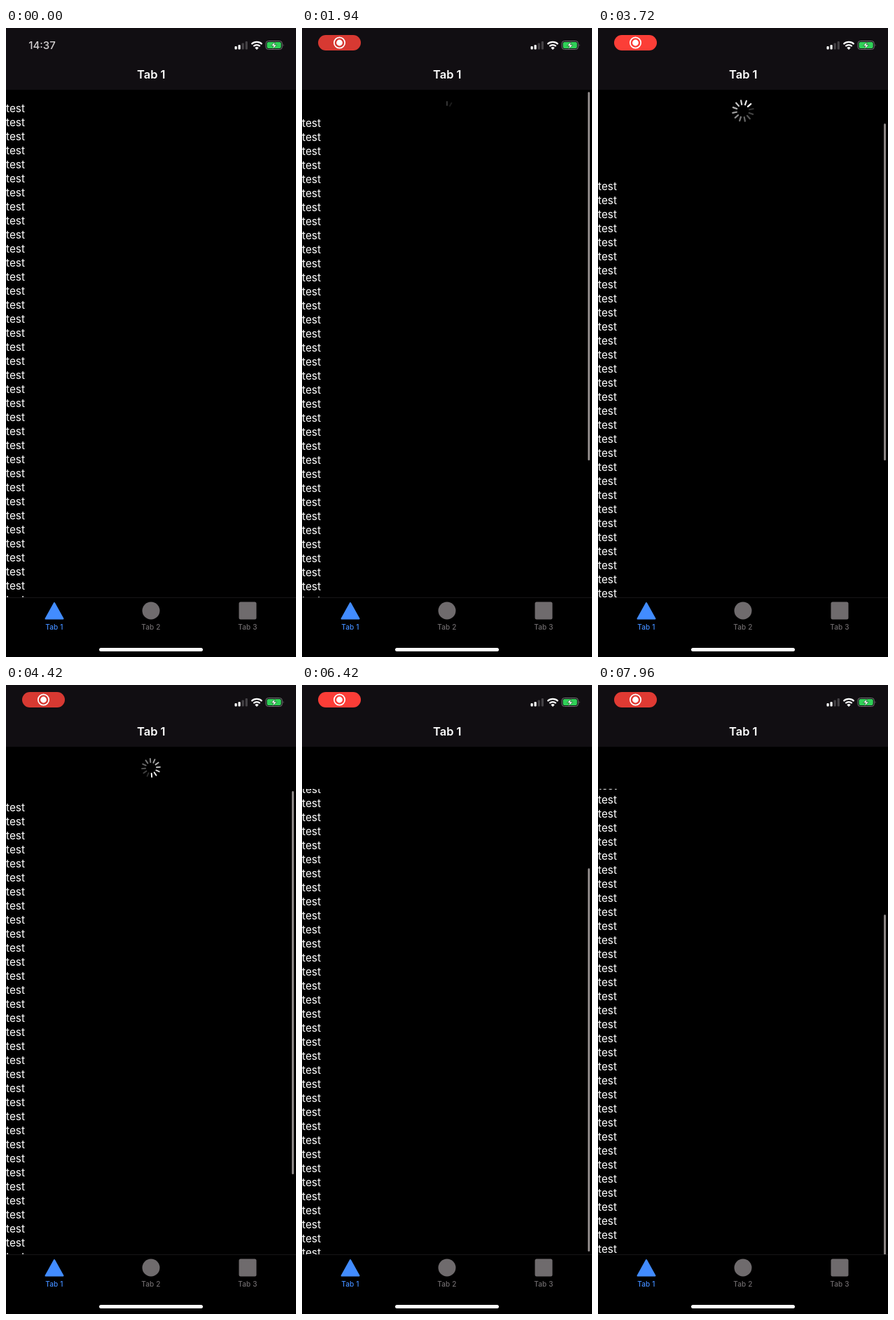
Animation of 414x896 px, one loop 8 s. Source, as an HTML page:

```html
<!DOCTYPE html>
<html lang="en">
<head>
<meta charset="utf-8">
<title>Pull to refresh</title>
<style>
  html, body { margin: 0; width: 100%; height: 100%; overflow: hidden; background: #000; }
  svg { display: block; width: 414px; height: 896px; font-family: Inter, "Open Sans", sans-serif; }
  .row { font-size: 15.4px; fill: #fff; }
  .title { font-size: 16.5px; font-weight: 600; fill: #fff; }
  .clock { font-size: 15px; font-weight: 500; fill: #d2cfd0; }
  .tab { font-size: 10px; font-weight: 500; letter-spacing: .2px; }
  .title, .clock, .tab { text-anchor: middle; }
</style>
</head>
<body>
<svg viewBox="0 0 414 896">
  <defs><clipPath id="viewport"><rect id="window" width="414" height="723" y="88"/></clipPath></defs>
  <rect width="414" height="896"/>
  <g id="spinner" stroke="#fff" stroke-width="1.9" stroke-linecap="round"></g>
  <g clip-path="url(#viewport)"><g id="list"></g></g>
  <rect id="bar" x="408" width="3" rx="1.5" fill="#8b8685"/>

  <rect width="414" height="88" fill="#110e12"/>
  <text class="title" x="207.3" y="72">Tab 1</text>
  <text class="clock" id="clock" x="51.5" y="30">14:37</text>
  <g id="pill">
    <rect id="pillShape" x="23" y="10" width="61" height="22" rx="11"/>
    <circle cx="53.5" cy="21" r="7.7" fill="none" stroke="#fff" stroke-width="1.7"/>
    <circle cx="53.5" cy="21" r="4.4" fill="#fff"/>
  </g>

  <g fill="#fff">
    <rect x="326.5" y="26" width="3.2" height="4.5" rx="1"/>
    <rect x="331.5" y="24" width="3.2" height="6.5" rx="1"/>
    <rect x="336.6" y="21.5" width="3.2" height="9" rx="1" fill="#454246"/>
    <rect x="341.7" y="19" width="3.2" height="11.5" rx="1" fill="#454246"/>
    <path d="M355.3 28.3a3.8 3.8 0 0 1 5.4 0L358 31z"/>
    <g fill="none" stroke="#fff" stroke-width="2.1">
      <path d="M353.3 26a6.8 6.8 0 0 1 9.4 0"/>
      <path d="M350.5 22.9a10.8 10.8 0 0 1 15 0"/>
    </g>
    <rect x="370.9" y="18.5" width="23.4" height="12" rx="3.6" fill="none" stroke="#737074"/>
    <path d="M395.7 22.7q1.7 1.8 0 3.8z" fill="#737074"/>
    <rect x="372.5" y="20.1" width="20.2" height="8.8" rx="2.2" fill="#30d158"/>
    <path d="M384.3 19.5l-5.8 5.8h3.4l-1.3 4.7 6-6h-3.6z" stroke="#123c18" stroke-width=".6"/>
  </g>

  <rect y="811" width="414" height="85"/>
  <rect y="811" width="414" height="1" fill="#161517"/>
  <g fill="#428cff">
    <path d="M69 819L81.5 841.5H56.5z" stroke="#428cff" stroke-width="2" stroke-linejoin="round"/>
    <text class="tab" x="69" y="857">Tab 1</text>
  </g>
  <g fill="#6f6b6d">
    <circle cx="207" cy="830" r="12.5"/>
    <text class="tab" x="207" y="857">Tab 2</text>
    <rect x="332.5" y="817.5" width="25" height="25" rx="2.5"/>
    <text class="tab" x="345" y="857">Tab 3</text>
  </g>
  <rect x="133" y="883" width="148" height="5" rx="2.5" fill="#fff"/>
</svg>
<script>
const LOOP = 8000, TICKS = 12, MAX_PULL = 143, MAX_SCROLL = 226, REFRESH_AT = 3615;

// [time, value]; a negative scroll is the pull beyond the top
const SCROLL = [[1800, 0], [1993, -21], [2300, -58], [2650, -93], [3020, -121], [3400, -138],
  [3610, -145], [3720, -66], [3800, -36], [3900, -16], [4030, -5], [4200, 0],
  [5280, 0], [5600, 24], [6000, 82], [6473, 145.5], [7000, 187], [7500, 213], [8013, 231]];
const SHIFT = [[REFRESH_AT, 0], [3720, 45], [3770, 55], [3830, 60]];
const POP = [[REFRESH_AT, 1], [3740, 1.18], [3865, 1]];
const PILL = [[40, 0], [260, 1]];

const el = id => document.getElementById(id);
const clamp = v => Math.max(0, Math.min(1, v));
const set = (node, attrs) => {
  for (const name in attrs) node.setAttribute(name, attrs[name]);
};
const add = (parent, tag, attrs) => {
  const node = document.createElementNS('http://www.w3.org/2000/svg', tag);
  set(node, attrs);
  return parent.appendChild(node);
};

function sample(table, t) {
  const next = table.findIndex(([time]) => time > t);
  if (next === 0) return table[0][1];
  if (next < 0) return table[table.length - 1][1];
  const [t0, v0] = table[next - 1], [t1, v1] = table[next];
  return v0 + (v1 - v0) * (t - t0) / (t1 - t0);
}

// Three evenly spaced poses per 140 ms, shown for 20, 20 and 100 ms.
function poseTime(t) {
  const local = (t + 60) % 140;
  return t - local + Math.min(2, Math.floor(local / 20)) * 140 / 3;
}

for (let i = 0; i < 46; i++) {
  add(el('list'), 'text', { class: 'row', x: 0, y: 120 + i * 20 }).textContent = 'test';
}
const ticks = Array.from({ length: TICKS }, (_, i) =>
  add(el('spinner'), 'path', { d: 'M0-8V-13', transform: `rotate(${i * 30})` }));

function tickOpacity(i, pull, refreshing) {
  if (refreshing) return 1 - ((1 - i + TICKS) % TICKS) * 0.075;
  const start = i / TICKS;
  return clamp(1.5 * (pull - start) / (1 - start));
}

function draw(t) {
  const scroll = sample(SCROLL, t), shift = sample(SHIFT, t);
  const pull = Math.max(0, -scroll), past = Math.max(0, scroll - MAX_SCROLL);
  const refreshing = t >= REFRESH_AT;

  set(el('window'), { y: 88 + shift });
  set(el('list'), { transform: `translate(0 ${shift - scroll})` });
  set(el('bar'), {
    y: 91 + shift + 171 * clamp(scroll / MAX_SCROLL) + past,
    height: 546 - pull - past,
    opacity: clamp((t - 1800) / 100)
  });

  const angle = refreshing ? (t - REFRESH_AT) * 0.18 : 0;
  set(el('spinner'), {
    transform: `translate(207 118) rotate(${angle}) scale(${sample(POP, t)})`,
    opacity: 1 - clamp(scroll / 30)
  });
  ticks.forEach((tick, i) => set(tick, { opacity: tickOpacity(i, pull / MAX_PULL, refreshing) }));

  const shown = sample(PILL, t);
  const glow = 0.5 + 0.5 * Math.cos(2 * Math.PI * (t / 1250 - 0.07));
  set(el('clock'), { opacity: 1 - shown });
  set(el('pill'), { opacity: shown });
  set(el('pillShape'), { fill: `rgb(${215 + 40 * glow},${57 + 5 * glow},${50 + 6 * glow})` });
}

const begin = performance.now();
function frame() {
  draw(poseTime((performance.now() - begin) % LOOP));
  requestAnimationFrame(frame);
}
frame();
</script>
</body>
</html>
```
